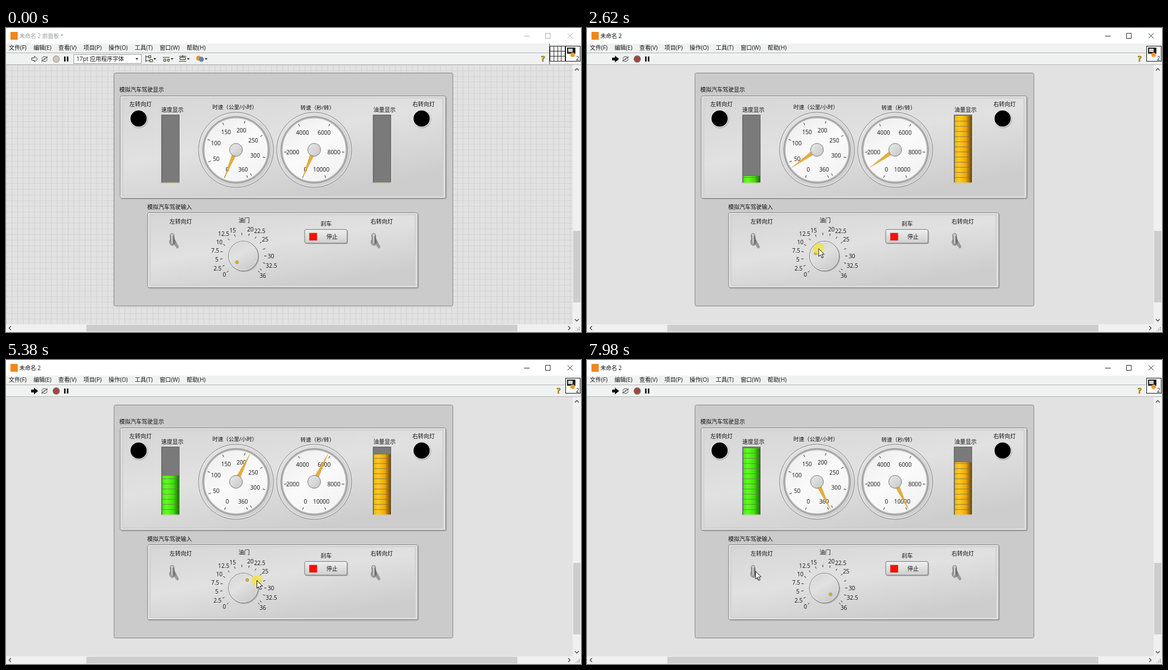
An HTML page that plays this animation: 1030x544 px, repeating every 8000 ms.

```html
<!DOCTYPE html>
<html lang="zh">
<head>
<meta charset="utf-8">
<title>未命名 2</title>
<style>
html, body { margin: 0; width: 100%; height: 100%; overflow: hidden; background: #e2e2e2; }
svg { display: block; width: 100%; height: 100%; }
text { font: 10px "Open Sans", "Noto Sans CJK SC", "Noto Sans CJK", sans-serif; fill: #111; white-space: pre; }
.mid { text-anchor: middle; }
.num { font-size: 10.2px; }
.wide { font-size: 9.6px; }
</style>
</head>
<body>
<svg id="stage" viewBox="0 0 1030 544" preserveAspectRatio="none">
  <defs>
    <pattern id="grid" y="66" width="10.1" height="10.1" patternUnits="userSpaceOnUse">
      <path d="M0 .5H10.1M.5 0V10.1" stroke="#d0d0d0" fill="none"/>
    </pattern>
    <linearGradient id="plate" x2=".6" y2="1"><stop stop-color="#d6d6d6"/><stop offset=".5" stop-color="#e1e1e1"/><stop offset="1" stop-color="#cdcdcd"/></linearGradient>
    <linearGradient id="ring" x2="1" y2="1"><stop stop-color="#e4e4e4"/><stop offset="1" stop-color="#cbcbcb"/></linearGradient>
    <linearGradient id="face" x2=".7" y2="1"><stop stop-color="#ececec"/><stop offset=".55" stop-color="#fafafa"/><stop offset="1" stop-color="#f3f3f3"/></linearGradient>
    <linearGradient id="hub" x2="1" y2="1"><stop stop-color="#e9e9e9"/><stop offset="1" stop-color="#c8c8c8"/></linearGradient>
    <linearGradient id="button" x2="0" y2="1"><stop stop-color="#efefef"/><stop offset="1" stop-color="#cfcfcf"/></linearGradient>
    <linearGradient id="green"><stop stop-color="#48e40f"/><stop offset=".25" stop-color="#60ff24"/><stop offset=".65" stop-color="#42e00c"/><stop offset="1" stop-color="#197006"/></linearGradient>
    <linearGradient id="amber"><stop stop-color="#f2b40f"/><stop offset=".25" stop-color="#ffca24"/><stop offset=".65" stop-color="#eea809"/><stop offset="1" stop-color="#6a470d"/></linearGradient>
    <linearGradient id="lever"><stop stop-color="#5c5c5c"/><stop offset=".4" stop-color="#dedede"/><stop offset="1" stop-color="#4a4a4a"/></linearGradient>
  </defs>

  <rect width="1030" height="544" fill="#e2e2e2"/>
  <rect class="edit" y="66" width="1015" height="464" fill="url(#grid)"/>

  <!-- window chrome -->
  <rect width="1030" height="28" fill="#fff"/>
  <rect x="8" y="7" width="13" height="14" fill="#f0871c"/>
  <text id="title" x="24" y="17.6"></text>
  <path id="controls" fill="none" d="M928 14.5h10M966.5 9.5h8.5v9h-8.500zM1006 9.5l9 9M1015 9.5l-9 9"/>
  <rect y="28" width="1030" height="38" fill="#f0f2f1"/>
  <path d="M0 44.5H1001M0 65.5H1030" stroke="#b2b2b2"/>
  <text id="menu" x="5" y="38.7" class="num"></text>

  <!-- toolbar -->
  <path class="edit" d="M46 53.5h5v-3l5.5 5-5.5 5v-3h-5z" fill="#fff" stroke="#222"/>
  <path class="run" d="M45 53h5v-3.5l7.5 6-7.5 6V58h-5z" fill="#111"/>
  <path d="M64 55q2-5 7-3.500l2 2M74 56q-2 5-7 3.500l-2-2M73.500 50.500v3.500H70M64.500 60.500V57H68" fill="none" stroke="#333"/>
  <circle cx="69" cy="55.500" r="1.300" fill="#555"/>
  <circle id="abort" cx="90" cy="55.500" r="5.600" stroke-width="1.600"/>
  <path d="M104 51h2.700v9H104zM109 51h2.700v9H109z" fill="#111"/>
  <g class="edit">
    <rect x="121.500" y="47.500" width="121" height="16" fill="#fff" stroke="#9a9a9a"/>
    <text x="126" y="59.300" class="num">17pt 应用程序字体</text>
    <path d="M232 54h5l-2.500 3zM264 54h5l-2.500 3zM295 54h5l-2.500 3zM324 54h5l-2.500 3zM356 54h5l-2.500 3z" fill="#222"/>
    <path d="M250.500 49v12M251 51.500h4M251 58.500h6M281 52.500h12M310 50.500h13M310 59.500h13M316.500 48v4" stroke="#333" fill="none"/>
    <path d="M255.500 49.500h4v4h-4zM257.500 56.500h5v4h-5zM282.500 55.500h4v4h-4zM289.500 55.500h3v4h-3zM311.500 52.500h10v4h-10z" fill="#e8e0a8" stroke="#333"/>
    <circle cx="345" cy="54" r="4.500" fill="#e39a35"/><circle cx="350" cy="56" r="4.500" fill="#5d86b4"/>
    <path d="M973.500 28v37" stroke="#444"/>
    <path d="M974.500 32.500h27v27h-27zM981.500 33v26M988.500 33v26M994.500 33v26M975 41.500h26M975 50.500h26" stroke="#222" fill="#fff"/>
  </g>
  <text id="help" y="60" class="mid" style="font-size:14px;font-weight:700;fill:#e5b414;stroke:#5a4500;stroke-width:.6">?</text>
  <rect x="1002.500" y="32.500" width="26" height="27" fill="#fff" stroke="#111"/>
  <path d="M1005 35h15v11h-15z" fill="#222"/><path d="M1007 37h8v6h-8z" fill="#cfd6cf"/>
  <circle cx="1015" cy="48" r="4" fill="#ef9a2d"/>
  <text x="1021" y="57.500">2</text>

  <!-- scroll bars -->
  <path d="M1015 66h15v478H0v-14h1015z" fill="#f0f0f0"/>
  <path d="M1016 363h13v128h-13zM144 531h772v12H144z" fill="#cdcdcd"/>
  <path d="M1019 76l3.500-3.500 3.500 3.500M1019 521l3.500 3.500 3.500-3.500M9 533.500l-3.500 3.500 3.500 3.500M1007 533.500l3.500 3.500-3.500 3.500" fill="none" stroke="#444" stroke-width="1.400"/>
  <path d="M1027 535v7M1024 538v4M1021 541v1" stroke="#aaa" stroke-width="2" stroke-dasharray="2 1"/>

  <rect x="193.500" y="80.500" width="607" height="417" rx="3" fill="#cbcbcb" stroke="#858585"/>
  <g id="panel"></g>
  <g id="tip"><rect x="447.500" y="393.500" width="43" height="19" fill="#ffffe1" stroke="#111"/><text id="value" class="mid num" x="469" y="406.700"></text></g>
  <circle id="press" r="10" fill="#f2e63c" fill-opacity=".75"/>
  <path id="arrow" d="M0 0v14l3.300-3 2.500 5.500 2.400-1.100-2.500-5.300H10z" fill="#fff" stroke="#111"/>
  <path id="beam" d="M-3-6.500h2l1 1 1-1h2M0-5.500V5.500M-3 6.500h2l1-1 1 1h2" fill="none" stroke="#222"/>
</svg>
<script>
const $ = id => document.getElementById(id);
const LOOP = 8000, ACTIVE = 1000, RUN = 1140;
const GRAB = 2280, DRAG = 2350, RELEASE = 7150;
const KNOB = [425, 408], KNOB_MAX = 36, GAUGE_Y = 218;

// Angles run clockwise from straight down.
function polar(cx, cy, r, deg) {
  const a = deg * Math.PI / 180;
  return [cx - r * Math.sin(a), cy + r * Math.cos(a)];
}
const dialAngle = f => 22.5 + f * 315;
const knobAngle = f => 45 + f * 270;
const range = (n, step) => Array.from({ length: n }, (_, i) => i * step);

const label = (x, y, s, cls = '') => `<text x="${x}" y="${y + 3.7}" class="${cls}">${s}</text>`;

function ticks(cx, cy, r1, r2, angles) {
  const d = angles.map(a => `M${polar(cx, cy, r1, a)}L${polar(cx, cy, r2, a)}`).join('');
  return `<path d="${d}" stroke="#222" fill="none"/>`;
}

const plate = (x, y, w, h) => `
  <rect x="${x + 1.5}" y="${y + 1.5}" width="${w}" height="${h}" rx="3" fill="#a8a8a8"/>
  <rect x="${x + .5}" y="${y + .5}" width="${w - 1}" height="${h - 1}" rx="3" fill="#d9d9d9" stroke="#808080"/>
  <rect x="${x + 1.5}" y="${y + 1.5}" width="${w - 3}" height="${h - 3}" rx="2" fill="none" stroke="#efefef"/>
  <rect x="${x + 5.5}" y="${y + 4.5}" width="${w - 11}" height="${h - 9}" fill="url(#plate)" stroke="#cbcbcb"/>`;

function gauge(cx, max, marks, names, id) {
  const at = v => dialAngle(v / max);
  const circle = (r, style) => `<circle cx="${cx}" cy="${GAUGE_Y}" r="${r}" ${style}/>`;
  const texts = names.map(v => {
    const [x, y] = polar(cx - 1.5, GAUGE_Y + 1, 37, at(v));
    return label(x, y, v, 'mid num');
  });
  return circle(67, 'fill="url(#ring)" stroke="#7d7d7d"') +
    circle(65.8, 'fill="none" stroke="#efefef"') +
    circle(58, 'fill="url(#face)" stroke="#b2b2b2" stroke-width="3"') +
    circle(59.7, 'fill="none" stroke="#8c8c8c"') +
    ticks(cx, GAUGE_Y, 49.5, 54, marks.map(at)) + texts.join('') +
    `<path id="${id}" d="M-3.500 9L0 55L3.500 9z" fill="#e5ac38" stroke="#c8983a" stroke-width=".4"/>` +
    circle(11.5, 'fill="url(#hub)" stroke="#777"');
}

function tank(x, id, paint) {
  const lines = range(12, 9.15).map(d => `M${x + 2} ${267.5 - d}h30`).join('');
  return `<path d="M${x + .5} 278V155.500h33" fill="none" stroke="#777"/>
    <path d="M${x + .5} 277.500h33V155" fill="none" stroke="#ececec"/>
    <rect x="${x + 1.5}" y="156" width="31" height="121" fill="#7a7a7a" stroke="#6a6a6a"/>
    <clipPath id="${id}Clip"><rect id="${id}" x="${x + 2}" width="30"/></clipPath>
    <g clip-path="url(#${id}Clip)"><rect x="${x + 2}" y="156" width="30" height="121" fill="url(#${paint})"/>
    <path d="${lines}" stroke="#6d6a58" stroke-opacity=".8"/></g>
    <rect id="${id}Top" x="${x + 2}" width="30" height="1" fill="#7d7452"/>
    <path d="M${x + 1} 277h32" stroke="#e8d9b4"/>`;
}

const led = x => `<circle cx="${x + .7}" cy="163" r="16.300" fill="#a8a8a8"/>
  <circle cx="${x}" cy="162" r="16" fill="#e8e8e8"/><circle cx="${x}" cy="162" r="14.500" fill="#000"/>`;

const toggle = x => `<path d="M${x + 2} 374l9 17q0 4-4 3l-6-9z" fill="#777" fill-opacity=".65"/>
  <ellipse cx="${x - .5}" cy="383" rx="5" ry="6" fill="#b5b5b5" stroke="#6e6e6e"/>
  <path d="M${x - 4.5} 371q.5-3.500 3.500-3.500t3.500 3.500l.5 14q-3 4-6 0z" fill="url(#lever)" stroke="#5a5a5a" stroke-width=".7"/>
  <ellipse cx="${x - 1}" cy="370.500" rx="2.800" ry="2" fill="#c9c9c9"/>`;

function knob() {
  const [cx, cy] = KNOB;
  const marks = [...range(15, 2.5), KNOB_MAX];
  const named = marks.filter(v => ![17.5, 27.5, 35].includes(v));
  const texts = named.map(v => {
    const [x, y] = polar(cx, cy, 46 + 1.8 * String(v).length, knobAngle(v / KNOB_MAX));
    return label(x, y, v, 'mid num');
  });
  return ticks(cx, cy, 37.5, 41.5, marks.map(v => knobAngle(v / KNOB_MAX))) + texts.join('') +
    `<circle cx="${cx + 1.5}" cy="${cy + 1.5}" r="27" fill="#ababab"/>
     <circle cx="${cx}" cy="${cy}" r="26.500" fill="url(#hub)" stroke="#747474"/>
     <circle cx="${cx}" cy="${cy}" r="25.500" fill="url(#plate)" stroke="#ececec"/>
     <circle id="dot" r="2.700" fill="#e5ac28" stroke="#a08030" stroke-width=".7"/>`;
}

const menu = ['文件(F)', '编辑(E)', '查看(V)', '项目(P)', '操作(O)', '工具(T)', '窗口(W)', '帮助(H)'];
$('menu').innerHTML = menu.map((s, i) => `<tspan dx="${i ? 12.5 : 0}">${s}</tspan>`).join('');

$('panel').innerHTML =
  plate(204, 121, 584, 184) + plate(253, 330, 485, 135) +
  label(203, 110.5, '模拟汽车驾驶显示') + label(253, 320.5, '模拟汽车驾驶输入') +
  label(221, 136, '左转向灯') + label(728, 136, '右转向灯') +
  label(278, 146, '速度显示') + label(658, 146, '油量显示') +
  label(410, 141, '时速（公里/小时）', 'mid wide') + label(558, 142, '转速（秒/转）', 'mid wide') +
  label(293, 346, '左转向灯') + label(653, 346, '右转向灯') +
  label(416.5, 344, '油门') + label(563.5, 350, '刹车') +
  led(237.5) + led(744.5) + tank(278, 'speed', 'green') + tank(657, 'fuel', 'amber') +
  gauge(412, 360, [...range(8, 50), 360], [...range(7, 50), 360], 'needleA') +
  gauge(552, 10000, range(6, 2000), range(6, 2000), 'needleB') +
  toggle(298.5) + toggle(659.5) +
  `<rect x="536" y="362" width="76.500" height="24.500" rx="3" fill="#a4a4a4"/>
   <rect x="535" y="360.500" width="76" height="24.500" rx="3" fill="url(#button)" stroke="#777"/>
   <rect x="543.500" y="367" width="13.500" height="13" fill="#f81000" stroke="#b33" stroke-width=".6"/>` +
  label(574, 373.5, '停止') + knob();

const clamp = u => Math.min(1, Math.max(0, u));
const ramp = (t, a, b) => clamp((t - a) / (b - a));
const ease = (t, a, b) => { const u = ramp(t, a, b); return u * u * (3 - 2 * u); };
const mix = (p, q, u) => p.map((v, i) => v + (q[i] - v) * u);
const within = (t, a, b) => t >= a && t < b;
const show = (el, on) => { el.style.display = on ? '' : 'none'; };

// The driver's turns of the knob, as [time, fraction].
const turns = [[DRAG, 0], [2620, .233], [3400, .78], [3690, .759153], [4600, .588],
  [5230, .59], [5380, .598], [5780, .72], [6000, .72], [6830, 1]];

const throttle = t => turns.slice(1).reduce((v, [time, to], i) => {
  const [from, start] = turns[i];
  return t > from ? start + (to - start) * ramp(t, from, time) : v;
}, 0);
const pace = t => .99 * throttle(t - 150);
const fuel = t => t < RUN ? 0 : 1 - Math.max(0, t - 3130) * 4.35e-5;

// While turning, the pointer leads the knob's dot by a fixed angle.
const held = t => polar(...KNOB, 14 + 14 * ease(t, DRAG, 3360) + 22 * ease(t, 5980, 6830), knobAngle(throttle(t)) + 34.5);

function pointer(t) {
  const play = [53, 58], word = [411, 361], lever = [302, 378];
  if (t < 1540) return mix([822, 490], play, ease(t, 130, 930));
  if (t < 1740) return mix(play, word, ramp(t, 1540, 1740));
  if (t < GRAB) return mix(word, held(GRAB), ease(t, 1740, GRAB));
  return mix(held(t), lever, ease(t, RELEASE, 7800));
}

function setTank(id, f) {
  const h = Math.max(1, Math.round(f * 121));
  $(id).setAttribute('y', 277 - h);
  $(id).setAttribute('height', h);
  $(id + 'Top').setAttribute('y', 277 - h);
}

function draw(t) {
  const running = t >= RUN, active = t >= ACTIVE;
  document.querySelectorAll('.edit').forEach(el => show(el, !running));
  document.querySelectorAll('.run').forEach(el => show(el, running));
  $('title').textContent = running ? '未命名 2' : '未命名 2 前面板 *';
  $('title').style.fill = active ? '#111' : '#999';
  $('controls').setAttribute('stroke', active ? '#222' : '#aaa');
  $('abort').setAttribute('fill', running ? '#a4453c' : '#d3c5b7');
  $('abort').setAttribute('stroke', running ? '#7d6260' : '#b5aaa0');
  $('help').setAttribute('x', running ? 990 : 962);

  const turn = dialAngle(pace(t));
  $('needleA').setAttribute('transform', `translate(412 ${GAUGE_Y}) rotate(${turn})`);
  $('needleB').setAttribute('transform', `translate(552 ${GAUGE_Y}) rotate(${turn})`);
  setTank('speed', pace(t));
  setTank('fuel', fuel(t));

  const [dx, dy] = polar(...KNOB, 16, knobAngle(throttle(t)));
  $('dot').setAttribute('cx', dx);
  $('dot').setAttribute('cy', dy);
  $('value').textContent = (throttle(t) * KNOB_MAX).toFixed(4);
  show($('tip'), within(t, 3160, 4400));

  const [x, y] = pointer(t), overText = within(t, 1700, 1790);
  for (const id of ['arrow', 'beam', 'press']) $(id).setAttribute('transform', `translate(${x} ${y})`);
  show($('arrow'), t >= 130 && !overText);
  show($('beam'), overText);
  show($('press'), within(t, ACTIVE, 1100) || within(t, GRAB, RELEASE));
}

const start = performance.now();
function tick() {
  draw((performance.now() - start) % LOOP);
  requestAnimationFrame(tick);
}
tick();
</script>
</body>
</html>
```
